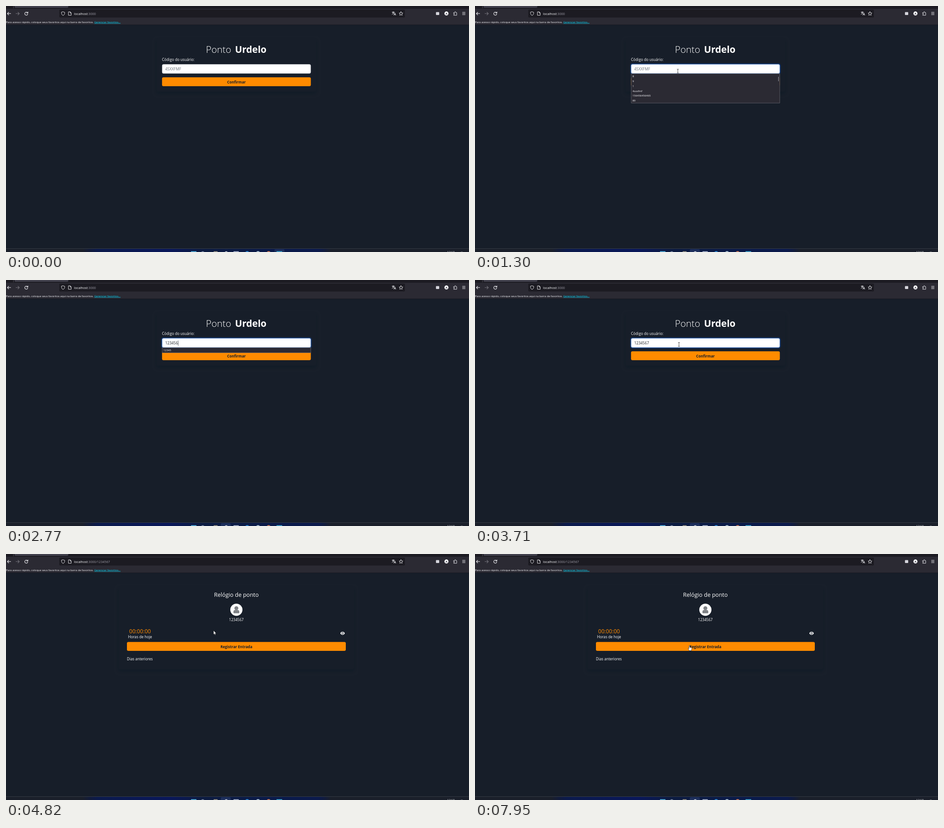
These frames come from a looping animation (1026 px wide and 546 px high, 8 s). An HTML page with a canvas:

```html
<!DOCTYPE html>
<html lang="pt-BR">
<head>
<meta charset="utf-8">
<title>Ponto</title>
<style>
html, body { margin: 0; width: 100%; height: 100%; overflow: hidden; background: #171e29; }
canvas { display: block; width: 1026px; height: 546px; }
</style>
</head>
<body>
<canvas id="stage"></canvas>
<script>
const W = 1026, H = 546, LOOP = 8000;
const canvas = document.getElementById('stage');
const ctx = canvas.getContext('2d');
const dpr = window.devicePixelRatio || 1;
canvas.width = W * dpr;
canvas.height = H * dpr;

const ORANGE = '#ff8b00', BAR = '#2b2a33', DARK = '#1c1b22', PAGE = '#171e29', ICON = '#f4f4f8';

// Typed digits appear one by one; the suggestion list follows a moment later.
const keyTimes = [1690, 1915, 2150, 2380, 2610, 2770, 3090];
const lists = [
  [1000, ['8', '9', '1', '4sxxfmf', '156456456465', '89']],
  [1765, ['1', '156456456465', '123', '12345', '1234', '12378']],
  [1990, ['123', '12345', '1234', '12378']],
  [2460, ['12345', '1234']],
  [2690, ['12345']],
  [2850, []]
];

// Pointer moves: start, end, number of steps, way points.
const moves = [
  [140, 600, 7, [[724, 434], [640, 330], [520, 190], [449.5, 144.5]]],
  [3710, 4270, 8, [[452, 143], [560, 118], [666, 107], [610, 140], [500, 168], [460, 170]]],
  [6600, 7400, 11, [[460, 169], [440, 150], [380, 90], [310, 80], [264, 120], [275, 160], [312, 168]]],
  [7480, 7950, 7, [[330, 168], [390, 175], [440, 195], [475, 203]]]
];

function rect(x, y, w, h, fill) {
  ctx.fillStyle = fill;
  ctx.fillRect(x, y, w, h);
}

function box(x, y, w, h, r, fill, stroke, lw = 1) {
  ctx.beginPath();
  ctx.roundRect(x, y, w, h, r);
  if (fill) { ctx.fillStyle = fill; ctx.fill(); }
  if (stroke) { ctx.strokeStyle = stroke; ctx.lineWidth = lw; ctx.stroke(); }
}

function disc(x, y, r, fill) {
  ctx.beginPath();
  ctx.arc(x, y, r, 0, Math.PI * 2);
  ctx.fillStyle = fill;
  ctx.fill();
}

function path(d, x, y, { fill, stroke, lw = 1 } = {}) {
  const p = new Path2D(d);
  ctx.save();
  ctx.translate(x, y);
  ctx.lineJoin = ctx.lineCap = 'round';
  if (fill) { ctx.fillStyle = fill; ctx.fill(p); }
  if (stroke) { ctx.strokeStyle = stroke; ctx.lineWidth = lw; ctx.stroke(p); }
  ctx.restore();
}

function text(s, x, y, size, color = '#fff', weight = 400, align = 'left') {
  ctx.font = `${weight} ${size}px "Open Sans", "Noto Sans", sans-serif`;
  ctx.textAlign = align;
  ctx.fillStyle = color;
  ctx.fillText(s, x, y);
  return ctx.measureText(s).width;
}

function browser(url) {
  rect(0, 0, W, 6, DARK);
  rect(16, 0, 1, 5, '#4a4953');
  box(19, -4, 119, 8, 2, '#42414d');
  rect(0, 6, W, 36, BAR);
  rect(0, 41.5, W, 0.7, '#11131a');
  box(118, 8, 766, 17.5, 2, DARK);

  const line = { stroke: ICON, lw: 1.1 };
  path('M4 0H-3.5M-0.5 -3L-3.5 0L-0.5 3', 6.5, 16.8, line);
  path('M-4 0H3.5M0.5 -3L3.5 0L0.5 3', 26, 16.8, { stroke: '#77767f', lw: 1.1 });
  path('M3.2 1A3.4 3.4 0 1 1 2.4 -2.3M3.6 -4V-1.2H0.8', 45, 17, line);
  path('M0 -4L3.6 -2.7C3.7 1 2.6 3 0 4.2C-2.6 3 -3.7 1 -3.6 -2.7Z', 126.5, 16.8, { stroke: ICON, lw: 0.9 });
  path('M-2.8 -3.8H0.8L3 -1.5V3.8H-2.8ZM0.6 -3.8V-1.3H3', 141.5, 16.8, { stroke: ICON, lw: 0.9 });
  path('M-4 -2.7H1.5M-1.3 -4V-2.7M0.2 -2.7C-0.5 -0.3 -2 1 -3.8 1.8M-2.7 -2.6C-2 -0.5 -1 0.5 0 1M0.2 4L2.2 -1L4.2 4M1 2.4H3.5', 859.5, 16.5, { stroke: ICON, lw: 0.95 });
  path('M0 -4.2L1.3 -1.5L4.2 -1.1L2.1 0.9L2.6 3.8L0 2.4L-2.6 3.8L-2.1 0.9L-4.2 -1.1L-1.3 -1.5Z', 875.3, 16.8, { stroke: ICON, lw: 0.9 });
  box(952.8, 13.4, 7.2, 6.6, 1, '#d5d5dc');
  disc(976, 16.6, 4.5, '#fbfbfe');
  text('A', 976, 18.8, 6, BAR, 700, 'center');
  path('M-3.6 -1.8H-1.4V-2.8A1.2 1.2 0 0 1 1 -2.8V-1.8H3V4H-3.6V2H-2.6A1.1 1.1 0 0 0 -2.6 -0.1H-3.6Z', 995.8, 16.6, { stroke: ICON, lw: 0.9 });
  path('M-3 -2.6H3M-3 0H3M-3 2.6H3', 1014.5, 16.6, { stroke: ICON, lw: 0.9 });

  const w = text('localhost', 151, 19.8, 7.15, '#fbfbfe');
  text(url, 151 + w, 19.8, 7.15, '#9f9ea8');
  text('Para acesso rápido, coloque seus favoritos aqui na barra de favoritos.', 194, 37.7, 6, '#fbfbfe', 400, 'right');
  const lw = text('Gerenciar favoritos…', 195.7, 37.7, 6, '#00ddff');
  rect(195.7, 38.6, lw, 0.6, '#00ddff');
}

function taskbar(activeX) {
  rect(0, 538, W, 8, '#1a1f2a');
  const g = ctx.createLinearGradient(170, 0, 720, 0);
  g.addColorStop(0, 'rgba(8,22,78,0)');
  g.addColorStop(0.06, '#0b1a4c');
  g.addColorStop(0.35, '#09175a');
  g.addColorStop(0.48, '#0c1b40');
  g.addColorStop(0.8, '#0a1a4a');
  g.addColorStop(0.95, '#0b1a4c');
  g.addColorStop(1, 'rgba(8,22,78,0)');
  rect(170, 539, 550, 7, g);
  rect(0, 538, W, 0.8, '#3d434d');
  box(activeX, 540, 22, 10, 2, '#1d2f5c');
  box(410, 544.4, 12, 6, 0, '#58bfea');
  disc(436, 549, 4.5, '#8c9bb5');
  box(460, 544.6, 9, 6, 1, '#a9a08a');
  disc(488, 548, 3.6, '#e6e9ef');
  box(504, 544.5, 12, 6, 1, '#b9c4dc');
  disc(534.5, 549, 5, '#2d8bd6');
  disc(558.5, 549, 5, '#a7bfd0');
  disc(582, 549, 5, '#c9795a');
  box(599.5, 544.4, 12.5, 6, 0, '#43b6dc');
  text('13:18', 986, 548.6, 6.4, '#e2e4e8', 400, 'center');
  disc(1010, 549.5, 4.5, '#6e737c');
}

function card(x, y, w, h) {
  ctx.save();
  ctx.shadowColor = 'rgba(5,22,32,0.4)';
  ctx.shadowBlur = 9 * dpr;
  ctx.shadowOffsetY = 4 * dpr;
  box(x, y, w, h, 3, PAGE);
  ctx.restore();
}

function button(x, y, w, label) {
  box(x, y, w, 19.7, 3.2, ORANGE);
  text(label, x + w / 2, y + 13.6, 8.1, '#171e29', 700, 'center');
}

function suggestions(t) {
  let rows = [];
  for (const [at, list] of lists) if (t >= at) rows = list;
  if (!rows.length) return;
  box(346.2, 150.2, 329.1, rows.length * 10.8 + 0.4, 0, BAR, '#65656f', 0.8);
  rows.forEach((s, i) => text(s, 349, 158.2 + i * 10.8, 5.9, '#fbfbfe'));
  if (t < 1765) rect(672, 157, 1, 10, t < 1150 ? '#5f5e68' : '#a09fa8');
}

function caretOn(t) {
  return t >= 840 && t < 1300 || t >= 1690 && t < 3400 || t >= 3950 && t < 4500;
}

function loginPage(t) {
  card(334, 72, 353, 118);
  text('Ponto', 443, 104, 20.9, '#fff', 300);
  text('Urdelo', 507.5, 104, 20.9, '#fff', 700);
  text('Código do usuário:', 345.7, 122.4, 8.2);
  button(345.8, 158.3, 329.7, 'Confirmar');

  const focus = Math.max(0, Math.min(1, (t - 700) / 160));
  if (focus) box(343.8, 127.3, 333.7, 24.7, 5, `rgba(13,110,253,${0.28 * focus})`);
  box(346.1, 129.6, 329.1, 20.1, 3, '#fff', focus ? '#86b7fe' : '#ced4da', 0.6);

  const typed = '1234567'.slice(0, keyTimes.filter(k => t >= k).length);
  let w = 0;
  if (typed) w = text(typed, 352.8, 143.3, 8.2, '#212529');
  else text('4SXXFMF', 352.8, 143.3, 8.4, '#6c757d');
  if (caretOn(t)) rect(353 + w, 134.5, 0.7, 11.3, '#212529');
  suggestions(t);
}

function clockPage() {
  card(250, 72, 521, 184);
  text('Relógio de ponto', 510.5, 94.7, 12.5, '#fff', 400, 'center');
  disc(510.5, 123.8, 13.5, '#fff');
  disc(510.5, 120.3, 4.3, '#7f8286');
  box(504, 124.2, 13, 7.4, [4, 4, 1.5, 1.5], '#7f8286');
  text('1234567', 510.5, 149, 8.1, '#fff', 400, 'center');
  text('00:00:00', 297, 176.3, 12.1, ORANGE, 400, 'center');
  text('Horas de hoje', 297, 187.4, 8.2, '#fff', 400, 'center');
  path('M-5 0C-3 -4.6 3 -4.6 5 0C3 4.6 -3 4.6 -5 0Z', 745.8, 176, { fill: '#fff' });
  disc(745.8, 176, 2.4, PAGE);
  disc(745.8, 176, 1.4, '#fff');
  button(268, 195.3, 485, 'Registrar Entrada');
  text('Dias anteriores', 268, 236.3, 8.1);
}

// Catmull-Rom curve through the way points, u from 0 to 1.
function along(pts, u) {
  const f = u * (pts.length - 1);
  const i = Math.min(Math.floor(f), pts.length - 2), s = f - i;
  const at = n => pts[Math.max(0, Math.min(pts.length - 1, n))];
  const [a, b, c, d] = [at(i - 1), at(i), at(i + 1), at(i + 2)];
  return [0, 1].map(k => b[k] + 0.5 * s * (c[k] - a[k] +
    s * (2 * a[k] - 5 * b[k] + 4 * c[k] - d[k] + s * (3 * (b[k] - c[k]) + d[k] - a[k]))));
}

function pointer(t, login) {
  if (t < 140 || t >= 1690 && t < 3710) return;
  const [start, end, n, pts] = moves.filter(m => t >= m[0]).pop();
  const u = Math.min(1, (t - start) / (end - start));
  const [x, y] = along(pts, Math.floor(u * (n - 1) + 1e-6) / (n - 1));
  const inside = (l, top, r, b) => x > l && x < r && y > top && y < b;

  if (login && inside(346, 129, 676, 150)) {
    path('M-1.6 -4.3H-0.5L0 -3.9L0.5 -4.3H1.6M0 -3.9V3.9M-1.6 4.3H-0.5L0 3.9L0.5 4.3H1.6', x, y, { stroke: '#222', lw: 0.8 });
  } else if (login ? inside(346, 158, 676, 178) : inside(268, 195, 753, 215)) {
    path('M-0.9 0.7C-0.8 -0.3 0.8 -0.3 0.9 0.7V4L4.6 4.9C5.4 5.2 5.7 5.7 5.6 6.4L5 9.2L4.4 11.5H0.2L-2.6 7.4C-3.1 6.5 -2 5.8 -1.4 6.4L-0.9 7Z', x, y, { fill: '#fff', stroke: '#222', lw: 0.7 });
  } else {
    path('M0 0V8.6L1.9 6.9L3.2 9.8L4.5 9.2L3.2 6.4H5.8Z', x, y, { fill: '#fff', stroke: '#111', lw: 0.5 });
  }
}

function draw(now) {
  const t = now % LOOP;
  const login = t < 4740;
  ctx.setTransform(dpr, 0, 0, dpr, 0, 0);
  rect(0, 0, W, H, PAGE);
  if (login) loginPage(t); else clockPage();
  browser(login ? ':3000' : ':3000/1234567');
  taskbar(t < 760 ? 595 : 476);
  pointer(t, login);
}

const origin = performance.now();
function tick() {
  draw(performance.now() - origin);
  requestAnimationFrame(tick);
}
tick();
</script>
</body>
</html>
```
